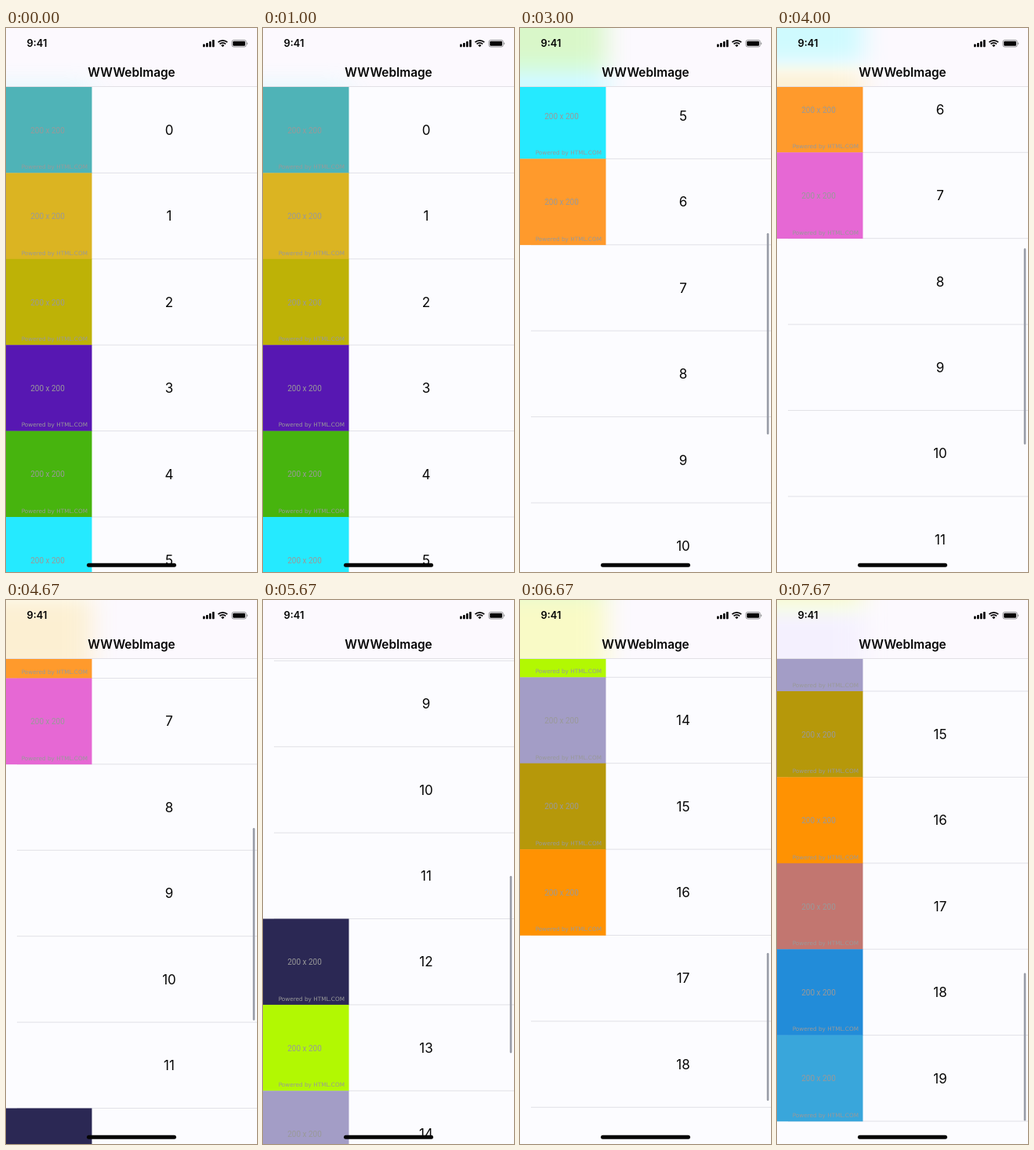
Animation of 320x692 px, one loop 8000 ms. Source, as an HTML page:

```html
<!DOCTYPE html>
<html lang="en">
<head>
<meta charset="utf-8">
<title>WWWebImage</title>
<style>
  html, body { margin: 0; width: 100%; height: 100%; overflow: hidden; background: #fcfcff; }
  svg { display: block; width: 320px; height: 692px; }
  text { font-family: Inter, "Liberation Sans", sans-serif; fill: #050505; }
  .number { font-size: 17px; text-anchor: middle; }
  .size { font: 10px Roboto, "Liberation Sans", sans-serif; fill: #999; text-anchor: middle; }
  .credit { font: 7.3px "DejaVu Sans", sans-serif; fill: #999; text-anchor: end; }
  .title { font-size: 15.4px; font-weight: 600; text-anchor: middle; }
  .clock { font-size: 12.8px; font-weight: 600; }
  .blur { filter: blur(16px) brightness(1.35); }
</style>
</head>
<body>
<svg viewBox="0 0 320 692">
  <defs>
    <clipPath id="navClip"><rect width="320" height="74"/></clipPath>
  </defs>
  <rect width="320" height="692" fill="#fcfcff"/>
  <g id="list"></g>
  <rect id="bar" x="314.7" width="2.6" rx="1.3" fill="#979ba6"/>

  <rect width="320" height="75" fill="#fcf9fe"/>
  <g clip-path="url(#navClip)" opacity=".22">
    <g class="blur"><g id="glow"></g></g>
  </g>
  <rect y="74" width="320" height="1" fill="#e2e0e6"/>
  <text class="title" x="160" y="61.5">WWWebImage</text>

  <text class="clock" x="26.5" y="24.2">9:41</text>
  <g fill="#050505">
    <rect x="251" y="20.5" width="2.7" height="3.7" rx=".7"/>
    <rect x="255" y="18.9" width="2.7" height="5.3" rx=".7"/>
    <rect x="259" y="17" width="2.7" height="7.2" rx=".7"/>
    <rect x="263" y="15" width="2.7" height="9.2" rx=".7"/>
    <path d="M276.3 24.3l-2.1-2.2a3 3 0 0 1 4.2 0z"/>
    <path d="M272.5 20.4a5.4 5.4 0 0 1 7.6 0M270.4 18.2a8.4 8.4 0 0 1 11.8 0"
      fill="none" stroke="#050505" stroke-width="1.7"/>
    <rect x="287.9" y="15.4" width="18.4" height="8.6" rx="2.4" fill="none" stroke="#8c8c8e" stroke-width=".9"/>
    <rect x="289.2" y="16.7" width="15.8" height="6" rx="1.3"/>
    <path d="M307.2 18.2a1.6 1.6 0 0 1 0 3z" fill="#8c8c8e"/>
    <rect x="103" y="680.8" width="114" height="5" rx="2.5"/>
  </g>
</svg>
<script>
const LOOP = 8, TOP = 75, ROW = 109.4, SIDE = 109.5, ROWS = 20;

// Placeholders arrive in batches of consecutive rows; rows 8 to 11 stay empty.
const batches = [
  { time: 0, row: 0, fills: ['#4fb3b7', '#dbb422', '#beb206', '#5717b2', '#47b40e', '#25eaff'] },
  { time: 2.5, row: 6, fills: ['#ff9a2c'] },
  { time: 4, row: 7, fills: ['#e668d4'] },
  { time: 4.5, row: 12, fills: ['#2b2854'] },
  { time: 5, row: 13, fills: ['#b2f802', '#a39dc6'] },
  { time: 6, row: 15, fills: ['#b6980a', '#ff9202'] },
  { time: 7, row: 17, fills: ['#c27670', '#228cd9', '#39a6db'] }
];

// Swipe path: seconds, scroll offset, top of the scroll bar.
const path = [
  [1.5, 0, 75], [2, 231.2, 159], [3, 565, 261], [4.5, 741.3, 290],
  [5.5, 982.3, 351], [6.5, 1508.3, 449], [7.5, 1600, 474.5]
];

const byId = id => document.getElementById(id);
const list = byId('list'), glow = byId('glow'), bar = byId('bar');
const clamp01 = x => Math.min(1, Math.max(0, x));
const lerp = (a, b, k) => a + (b - a) * k;

function add(parent, tag, attrs, text) {
  const node = document.createElementNS('http://www.w3.org/2000/svg', tag);
  for (const key in attrs) node.setAttribute(key, attrs[key]);
  if (text !== undefined) node.textContent = text;
  return parent.appendChild(node);
}

function addPicture(row, fill) {
  const y = TOP + row * ROW;
  const picture = add(list, 'g', { transform: `translate(0 ${y})` });
  add(picture, 'rect', { width: SIDE, height: ROW + .3, fill });
  add(picture, 'text', { class: 'size', x: 53, y: 58.8 }, '200 x 200');
  add(picture, 'text', { class: 'credit', x: 104, y: 104.3 }, 'Powered by HTML.COM');
  const shade = add(glow, 'rect', { x: -60, y, width: SIDE + 60, height: ROW + .3, fill });
  return [picture, shade];
}

for (let i = 0; i < ROWS; i++) {
  const y = TOP + i * ROW;
  add(list, 'rect', { x: 14, y: y + ROW - .5, width: 306, height: 1, fill: '#e2e2e7' });
  add(list, 'text', { class: 'number', x: 208, y: y + 61 }, i);
}
for (const batch of batches) {
  batch.nodes = batch.fills.flatMap((fill, i) => addPicture(batch.row + i, fill));
}

function heldTime(t) {
  const whole = Math.floor(t);
  return t - whole >= .67 ? whole + .5 : whole;
}

function positionAt(t) {
  const next = Math.max(1, path.findIndex(point => point[0] >= t));
  const [a, b] = [path[next - 1], path[next]];
  const k = clamp01((t - a[0]) / (b[0] - a[0]));
  return { scroll: lerp(a[1], b[1], k), barTop: lerp(a[2], b[2], k) };
}

function draw(seconds) {
  const t = heldTime(seconds);
  const { scroll, barTop } = positionAt(t);
  const shift = `translate(0 ${-scroll})`;
  list.setAttribute('transform', shift);
  glow.setAttribute('transform', shift);
  // The bar shrinks as the estimated content height grows.
  bar.setAttribute('y', barTop);
  bar.setAttribute('height', lerp(256, 188, clamp01((scroll - 600) / 850)));
  bar.setAttribute('visibility', scroll > 0 ? 'visible' : 'hidden');
  for (const { time, nodes } of batches) {
    for (const node of nodes) node.setAttribute('visibility', t >= time ? 'visible' : 'hidden');
  }
}

const start = performance.now();
function tick() {
  draw((performance.now() - start) / 1000 % LOOP);
  requestAnimationFrame(tick);
}
tick();
</script>
</body>
</html>
```
